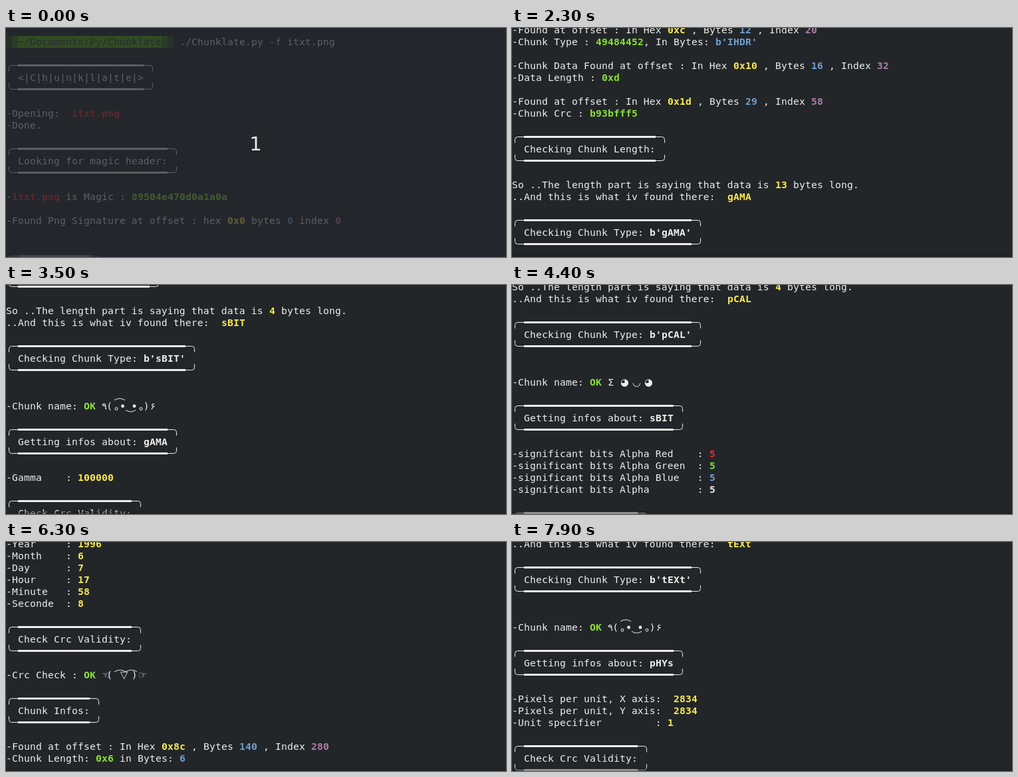
Write an HTML page that moves like this. It is 752x346 px and loops after 8000 ms.

```html
<!DOCTYPE html>
<html lang="en">
<head>
<meta charset="utf-8">
<title>Terminal scroll</title>
<style>
  html, body { margin: 0; width: 100%; height: 100%; overflow: hidden; background: #222629; }
  svg { display: block; width: 752px; height: 346px; }
  text {
    font: 14.667px "DejaVu Sans Mono", "Liberation Mono", monospace;
    letter-spacing: .17px; white-space: pre; fill: #eeeeec;
  }
  text.b { font-weight: bold; }
  text.face { font-family: "DejaVu Sans", sans-serif; letter-spacing: 0; }
  text.count { font: 29px "DejaVu Sans", sans-serif; letter-spacing: 0; fill: #e9e9e9; }
  .thin { fill: none; stroke: #eeeeec; stroke-width: 1; }
  .thick { stroke: #eeeeec; stroke-width: 3; }
</style>
</head>
<body>
<svg viewBox="0 0 752 346">
  <rect width="752" height="346" fill="#222629"/>
  <g id="page"></g>
  <rect y="342" width="752" height="4" fill="#1c1f22" opacity=".45"/>
  <g id="countdown">
    <rect width="752" height="346" fill="#24282f" opacity=".72"/>
    <text class="count" x="375.5" y="185" text-anchor="middle">1</text>
  </g>
</svg>
<script>
const CELL = 9, LINE = 18, LOOP = 8000;
const COLORS = { r: '#ef2929', g: '#8ae234', y: '#fce94f', b: '#729fcf', p: '#ad7fa8', w: '#eeeeec' };
const page = document.getElementById('page');
const countdown = document.getElementById('countdown');
const out = [];
let row = 0;

const mid = () => 3 + LINE * row;
const esc = s => s.replace(/&/g, '&amp;').replace(/</g, '&lt;');
const hex = n => '0x' + n.toString(16);
const plain = s => s.replace(/\{\w ([^}]*)\}/g, '$1');

function put(col, str, color) {
  const look = color ? ` class="b" style="fill:${COLORS[color]}"` : '';
  out.push(`<text x="${col * CELL}" y="${mid() + 5}"${look}>${esc(str)}</text>`);
}

// Writes one row; {c text} is bold text in colour c.
function say(str = '', col = 0) {
  for (const part of str.split(/(\{\w [^}]*\})/)) {
    const m = /^\{(\w) ([^}]*)\}$/.exec(part);
    const body = m ? m[2] : part;
    if (body.trim()) put(col, body, m && m[1]);
    col += body.length;
  }
  row++;
}

function edge(len, dir) {
  const y = mid() - .5, end = (len + 2) * CELL, right = end + 13.5;
  out.push(`<path class="thin" d="M4.5 ${y + 9 * dir}V${y + 4 * dir}Q4.5 ${y} 8.5 ${y}H18M${end} ${y}` +
    `H${right - 4}Q${right} ${y} ${right} ${y + 4 * dir}V${y + 9 * dir}"/>` +
    `<path class="thick" d="M18 ${y}H${end}"/>`);
  row++;
}

function box(title) {
  const len = plain(title).length;
  edge(len, 1);
  say(title, 2);
  edge(len, -1);
  say();
}

const glyph = (x, s) => `<text class="face" x="${x}" y="${mid() + 5}">${s}</text>`;
const curve = (x, dy, w, bend) => `<path class="thin" d="M${x} ${mid() + dy}q${w / 2} ${bend} ${w} 0"/>`;
const ring = x => `<circle class="thin" cx="${x}" cy="${mid() + 4}" r="2"/>`;
const dot = x => `<circle cx="${x}" cy="${mid()}" r="2.4" fill="#eeeeec"/>`;

const FACES = {
  hands: () => glyph(144, '☜') + glyph(153, '(') + glyph(172, '▽') + glyph(190, ')') + glyph(199, '☞') +
    curve(163, -5, 17, -5) + curve(180, -5, 17, -5),
  eyes: () => glyph(144, 'Σ') + glyph(163, '◕') + glyph(181, '◡') + glyph(199, '◕'),
  cheer: () => glyph(144, '٩') + glyph(153, '(') + glyph(208, ')') + glyph(217, '۶') +
    ring(166) + dot(175.5) + dot(193) + ring(203) + curve(163, -9, 16, -5) + curve(180, 6, 15, 5)
};

function verdict(label, face) {
  out.push(FACES[face]());
  say(`${label}: {g OK}`);
  say();
}

function found(at, index, what = '-Found') {
  say(`${what} at offset : In Hex {y ${hex(at)}} , Bytes {b ${at}} , Index {p ${index}}`);
}

function chunk(name, at, size, next, infos, nameFace, crcFace) {
  const code = [...name].map(c => c.charCodeAt(0).toString(16)).join('');
  const crcAt = at + 8 + size;
  const crc = (Math.imul(at * 7919 + size, 2654435761) >>> 0).toString(16).padStart(8, '0');

  box('Chunk Infos:');
  found(at, at * 2);
  say(`-Chunk Length: {g ${hex(size)}} in Bytes: {b ${size}}`);
  say();
  found(at + 4, at * 2 + 4);
  say(`-Chunk Type : {g ${code}}, In Bytes: {b b'${name}'}`);
  say();
  found(at + 8, at * 2 + 16, '-Chunk Data Found');
  say(`-Data Length : {g ${hex(size)}}`);
  say();
  found(crcAt, crcAt * 2);
  say(`-Chunk Crc : {g ${crc}}`);
  say();
  box('Checking Chunk Length:');
  say(`So ..The length part is saying that data is {y ${size}} bytes long.`);
  say(`..And this is what iv found there:  {y ${next}}`);
  say();
  box(`Checking Chunk Type: {w b'${next}'}`);
  say();
  verdict('-Chunk name', nameFace);
  box(`Getting infos about: {w ${name}}`);
  infos.forEach(s => say(s));
  say();
  box('Check Crc Validity:');
  verdict('-Crc Check ', crcFace);
}

const field = (label, width, value, color = 'y') => `${('-' + label).padEnd(width)}: {${color} ${value}}`;
const fields = (width, pairs) => Object.entries(pairs).map(([k, v]) => field(k, width, v));

function prompt() {
  const y = mid() - 9;
  const block = (col, n, alpha) =>
    out.push(`<rect x="${col * CELL}" y="${y}" width="${n * CELL}" height="${LINE}" fill="#52a808" opacity="${alpha}"/>`);
  block(0, 1, .2);
  block(1, 1, .6);
  block(2, 24, 1);
  block(26, 1, .6);
  block(27, 1, .3);
  out.push(`<text x="18" y="${y + 14}" style="fill:#2e3436">~/Documents/Py/Chunklate</text>`);
  say('./Chunklate.py -f itxt.png', 29);
}

function build() {
  say();
  prompt();
  say();
  box('<|C|h|u|n|k|l|a|t|e|>');
  say('-Opening:  {r itxt.png}');
  say('-Done.');
  say();
  box('Looking for magic header:');
  say('-{r itxt.png} is Magic : {g 89504e470d0a1a0a}');
  say();
  say('-Found Png Signature at offset : hex {y 0x0} bytes {b 0} index {p 0}');
  say();
  say();
  chunk('IHDR', 8, 13, 'gAMA',
    fields(10, { Width: 91, Height: 69, Depht: 8, Color: 6, Method: 0, Interlace: 0 }), 'eyes', 'hands');
  chunk('gAMA', 33, 4, 'sBIT', fields(10, { Gamma: 100000 }), 'cheer', 'cheer');
  const bits = (label, color) => field('significant bits Alpha' + label, 31, 5, color);
  chunk('sBIT', 49, 4, 'pCAL',
    [bits(' Red', 'r'), bits(' Green', 'g'), bits(' Blue', 'b'), bits('', 'w')], 'eyes', 'hands');
  chunk('pCAL', 65, 44, 'tIME',
    [field('Number of parameters', 25, 116),
     "{r Error pCAL2:} {y invalid literal for int() with base 16: '[]'}"], 'hands', 'eyes');
  chunk('tIME', 121, 7, 'bKGD',
    fields(10, { Year: 1996, Month: 6, Day: 7, Hour: 17, Minute: 58, Seconde: 8 }), 'cheer', 'hands');
  chunk('bKGD', 140, 6, 'pHYs', fields(10, { Red: 255, Green: 255, Blue: 255 }), 'hands', 'eyes');
  chunk('pHYs', 158, 9, 'tEXt',
    ['-Pixels per unit, X axis:  {y 2834}', '-Pixels per unit, Y axis:  {y 2834}',
     field('Unit specifier', 24, 1)], 'cheer', 'hands');
  page.innerHTML = out.join('');
}

// [time in units of 100 ms, first visible row]
const SCROLL = [
  [0, 0], [15, 4], [16, 10], [19, 14], [20, 22], [23, 26], [24, 33], [25, 37], [27, 48], [28, 54],
  [31, 60], [32, 68], [35, 84], [37, 96], [39, 108], [43, 120], [44, 128], [47, 138], [48, 148],
  [51, 160], [52, 172], [55, 185], [59, 200], [60, 212], [63, 230], [65, 240], [67, 250],
  [70, 258], [71, 266], [72, 280], [75, 292], [79, 308]
];

function draw(ms) {
  let top = 0;
  for (const [at, first] of SCROLL) if (ms >= at * 100) top = first;
  page.setAttribute('transform', `translate(0 ${-top * LINE})`);
  countdown.style.display = ms < 100 ? '' : 'none';
}

build();
const start = performance.now();
function tick() {
  draw((performance.now() - start) % LOOP);
  requestAnimationFrame(tick);
}
tick();
</script>
</body>
</html>
```
